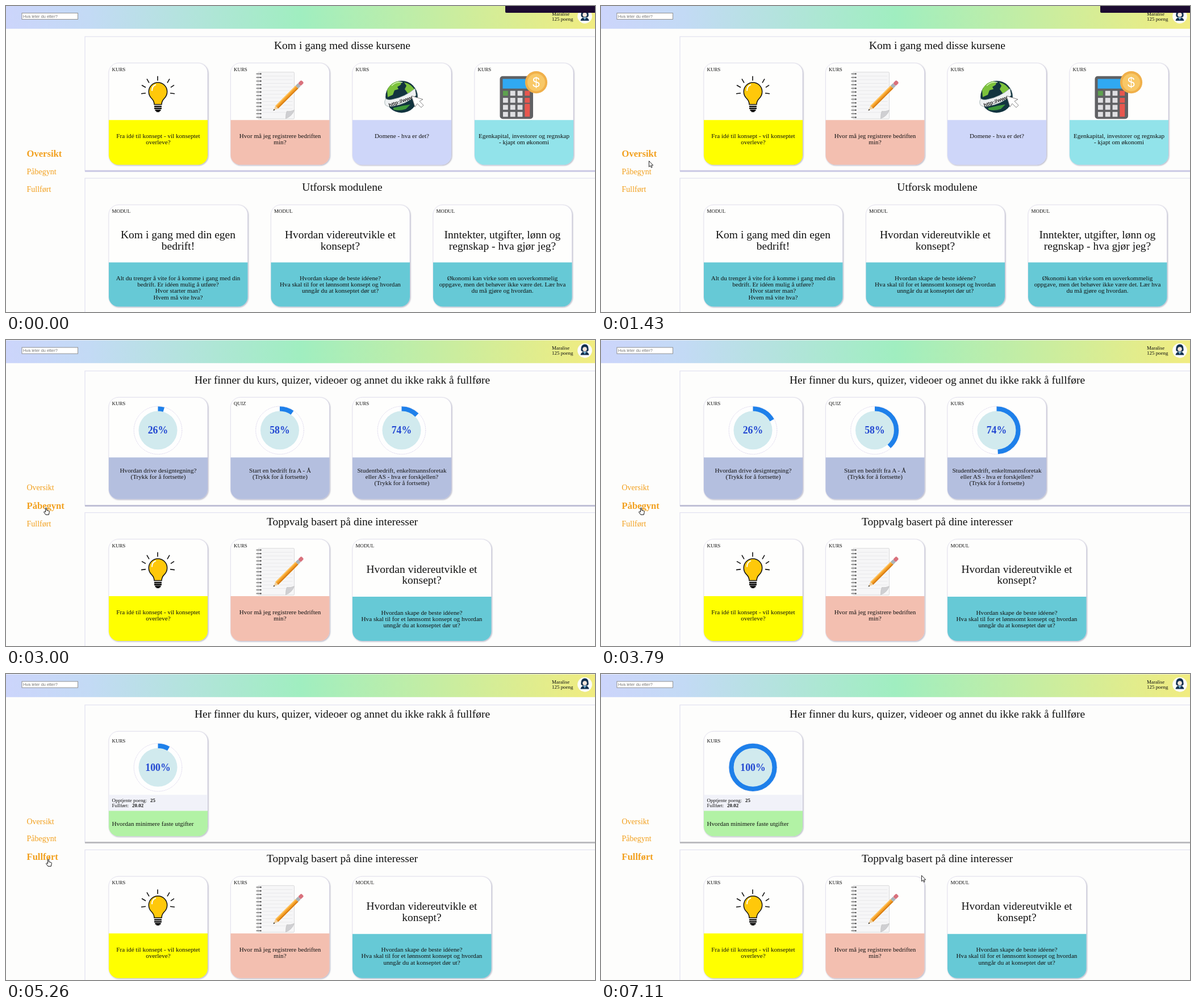
An HTML page for the animation above (7.16 s loop, 1037 by 540 pixels).

```html
<!DOCTYPE html>
<html lang="no">
<head>
<meta charset="utf-8">
<style>
  html, body { margin: 0; width: 100%; height: 100%; overflow: hidden; background: #fdfdfc; }
  svg { display: block; width: 1037px; height: 540px; font-family: "Liberation Serif", serif; fill: #111; }
  .mid { text-anchor: middle; }
  .title { font-size: 19.5px; }
  .body { font-size: 11.15px; }
  .small { font-size: 8.95px; }
  .pct { font: bold 17.8px "Liberation Serif", serif; fill: #2348d2; }
  .nav { font-size: 14px; fill: #f2a01e; }
  .nav.on { font-size: 16.6px; font-weight: bold; }
  .card { filter: drop-shadow(1.6px 1.6px 1.2px #70709088); }
  .status { font: 6.87px "Open Sans", sans-serif; fill: #555; }
</style>
</head>
<body>
<svg id="stage" viewBox="0 0 1037 540"></svg>
<script>
const LOOP = 7160, PAGE_STARTS = [0, 2730, 5130], RING_TIME = 1600;
const LINKS = [['Oversikt', 0], ['Påbegynt', 284], ['Fullført', 315]];
const BLUE = '#b4bfdf', TEAL = '#66c9d6';

const rect = (x, y, w, h, fill, more = '') =>
  `<rect x="${x}" y="${y}" width="${w}" height="${h}" fill="${fill}" ${more}/>`;
const circle = (x, y, r, fill, more = '') => `<circle cx="${x}" cy="${y}" r="${r}" fill="${fill}" ${more}/>`;
const path = (d, fill, stroke = 'none', width = 1) =>
  `<path d="${d}" fill="${fill}" stroke="${stroke}" stroke-width="${width}"/>`;
const text = (x, y, cls, str) => `<text x="${x}" y="${y}" class="${cls}">${str}</text>`;
const lines = (x, y, cls, list, step) => list.map((s, i) => text(x, y + i * step, cls, s)).join('');
const at = (x, y, inner, more = '') => `<g transform="translate(${x} ${y}) ${more}">${inner}</g>`;
const repeat = (n, make) => Array.from({ length: n }, (_, i) => make(i)).join('');

// Icons are drawn relative to the top left corner of their card.
const bulb =
  path('M86 23v8M67 28l4 7M107 28l-4 7M58 39l7 4M115 39l-6 4M57 54l8-1M108 53l8 1', 'none', '#111', 1.6) +
  path('M80 73q0-6-5-11a16.200 16.200 0 1 1 23 0q-5 5-5 11z', '#ffc80a', '#111', 1.5) +
  path('M76 49q0-9 7-11', 'none', '#fff', 2) +
  path('M80 76.500h13M80 80h13M81.500 83.300h10', 'none', '#111', 2.6) +
  path('M83 84h7l-1 2.500h-5z', '#111');

const notepad =
  rect(48, 16, 64, 82.5, '#f6f6f7', 'stroke="#d2d2d4" stroke-width=".8" rx="1.5"') +
  repeat(11, i => path(`M56 ${23 + i * 6.4}H109`, 'none', '#e2e2e6', .7)) +
  path('M97 98q0-9 2-13 6 1 13-2-4 11-15 15z', '#cfcfd2', '#bbb', .6) +
  repeat(13, i => path(`M45 ${19 + i * 6.4}h8`, 'none', '#888', 1.8) + circle(53, 19 + i * 6.4, 1.2, '#444')) +
  at(75, 84,
    path('M0 0L9-3.400V3.400z', '#f0cf9c') + path('M0 0L3-1.200V1.200z', '#222') +
    rect(9, -3.4, 50, 6.8, '#f5a028') + rect(9, 1.2, 50, 2.2, '#d97f16') + rect(9, -3.4, 50, 1.7, '#ffc45c') +
    rect(59, -3.4, 6, 6.8, '#a9b2b8') + rect(65, -3.4, 8, 6.8, '#d9717c', 'rx="2"'), 'rotate(-45)');

const globe =
  circle(86.5, 59.5, 28.3, '#12343f') +
  path('M61 48q6-14 20-16 8 2 3 7l-5 3 2 4-7 2-3 8-9 4zM91 34q14 3 20 16l-7 6-7-3-5-7 3-6z', '#7cc23c') +
  path('M72 82q10 3 22-1l8-8-12 2-18 4z', '#3f9a3a') +
  path('M69 40q8-8 19-6', 'none', '#d9f2c0', 1.5) +
  path('M59 63q-4 5-1 11 4 4 13 2Q94 73 112 57l-2-12Q92 60 71 64q-8 2-12-1z', '#eef1f2', '#9aa', .8) +
  `<text transform="translate(65 77.500) rotate(-19)" font-family="Liberation Sans, sans-serif" font-weight="bold" font-size="9" fill="#222">http://www</text>` +
  path('M104 58l20 6-6 3.500 7 7-4 4-7-7-4 6z', '#fff', '#777', .9);

const calculator =
  rect(44.5, 23, 58.5, 75.5, '#606164', 'rx="5"') + rect(49.5, 28, 48, 17, '#30a9f2') +
  repeat(15, i => rect(50 + i % 4 * 12.8, 49 + (i >> 2) * 12.4, 8.8, 8.6,
    i == 0 ? '#5ea24f' : i % 4 == 3 ? '#e8574f' : '#dfdfe2')) +
  rect(88.4, 72, 8.8, 22.6, '#e8574f') +
  circle(108.5, 34, 19.6, '#f0b04a') + circle(108.5, 34, 15.5, '#f8c867') +
  '<text x="108.500" y="42" class="mid" font-family="Liberation Sans, sans-serif" font-size="23" fill="#fff">$</text>';

const ring = (percent, y = 58) =>
  circle(86.5, y, 42.3, '#fefefe', 'stroke="#cfc8e6" stroke-width=".7" stroke-dasharray="2 1"') +
  circle(86.5, y, 34, '#d1eaee') +
  `<circle class="arc" data-percent="${percent}" cx="86.5" cy="${y}" r="38" pathLength="100" fill="none"
    stroke="#1e80ea" stroke-width="8.2" transform="rotate(-90 86.5 ${y})"/>` +
  text(86.5, y + 6, 'mid pct', percent + '%');

const card = (x, y, w, h, split, color, inner) => at(x, y,
  `<g class="card">${rect(0, 0, w, h, '#fefefd', 'rx="17" stroke="#d9d6ea" stroke-width=".6"')}</g>` +
  path(`M0 ${split}H${w}V${h - 17}a17 17 0 0 1-17 17H17a17 17 0 0 1-17-17z`, color) + inner);

const course = (x, y, color, icon, words, label = 'KURS', split = 100.5) =>
  card(x, y, 174, 179.5, split, color,
    icon + text(5.5, 14, 'small', label) + lines(87, 132.6, 'mid body', words, 11.2));

const modul = (x, title, words) => card(x, 351, 244.5, 179.5, 101.5, TEAL,
  text(5.5, 14, 'small', 'MODUL') + lines(122, 59, 'mid title', title, 19.7) +
  lines(122, 133, 'mid body', words, 11.2));

const section = (y, h, title, shadow) =>
  rect(139, y, 910, h, '#fdfdfc', 'stroke="#e2e1f0" stroke-width="1.2"') +
  path(`M139 ${y + h + .3}H1037`, 'none', shadow, 3) + text(592, y + 22, 'mid title', title);

const nav = (active, ys) => LINKS.map(([name], i) =>
  text(36.5, ys[i], i == active ? 'nav on' : 'nav', name)).join('');

const idea = y => course(181, y, '#ffff00', bulb, ['Fra idé til konsept - vil konseptet', 'overleve?']);
const register = y => course(395.5, y, '#f3bfb0', notepad, ['Hvor må jeg registrere bedriften', 'min?']);
const develop = x => modul(x, ['Hvordan videreutvikle et', 'konsept?'],
  ['Hvordan skape de beste idéene?', 'Hva skal til for et lønnsomt konsept og hvordan', 'unngår du at konseptet dør ut?']);

const overview = nav(0, [266, 297, 328]) +
  section(54, 237, 'Kom i gang med disse kursene', '#cac8e4') +
  idea(100.7) + register(100.7) +
  course(610, 100.7, '#ced6f9', globe, ['Domene - hva er det?']) +
  course(825, 100.7, '#92e3ea', calculator, ['Egenkapital, investorer og regnskap', '- kjapt om økonomi']) +
  section(304, 260, 'Utforsk modulene', '#cac8e4') +
  modul(181, ['Kom i gang med din egen', 'bedrift!'],
    ['Alt du trenger å vite for å komme i gang med din', 'bedrift. Er idéen mulig å utføre?', 'Hvor starter man?', 'Hvem må vite hva?']) +
  develop(466.5) +
  modul(752, ['Inntekter, utgifter, lønn og', 'regnskap - hva gjør jeg?'],
    ['Økonomi kan virke som en uoverkommelig', 'oppgave, men det behøver ikke være det. Lær hva', 'du må gjøre og hvordan.']);

const unfinished = 'Her finner du kurs, quizer, videoer og annet du ikke rakk å fullføre';
const goOn = '(Trykk for å fortsette)';
const topPicks = section(304, 260, 'Toppvalg basert på dine interesser', '#bbb') +
  idea(351) + register(351) + develop(610);

const started = nav(1, [264, 297, 328]) + section(54, 237.5, unfinished, '#c0c0d6') +
  course(181, 100.7, BLUE, ring(26), ['Hvordan drive designtegning?', goOn], 'KURS', 106) +
  course(395.5, 100.7, BLUE, ring(58), ['Start en bedrift fra A - Å', goOn], 'QUIZ', 106) +
  course(610, 100.7, BLUE, ring(74), ['Studentbedrift, enkeltmannsforetak', 'eller AS - hva er forskjellen?', goOn], 'KURS', 106) +
  topPicks;

const finished = nav(2, [264, 294.5, 327.5]) + section(54, 242.5, unfinished, '#bcbcc0') +
  card(181, 100.7, 174, 185, 140, '#b2f2a5',
    rect(0, 112, 174, 28, '#f1f2f9') + text(5.5, 20, 'small', 'KURS') + ring(100, 63.5) +
    lines(5.5, 124.5, 'small', [
      'Opptjente poeng: <tspan x="73" font-weight="bold">25</tspan>',
      'Fullført: <tspan x="41" font-weight="bold">20.02</tspan>'], 9) +
    text(5.5, 167, 'body', 'Hvordan minimere faste utgifter')) +
  at(0, 5.7, topPicks);

const header = rect(0, 0, 1037, 40.2, 'url(#sky)') +
  rect(28, 12.5, 98.5, 11, '#fff', 'stroke="#888" stroke-width=".9"') +
  '<text x="30" y="20.500" font-family="Liberation Sans, sans-serif" font-size="7.4" fill="#777">Hva leter du etter?</text>' +
  text(961, 16.8, 'small', 'Maralise') + text(961, 25.6, 'small', '125 poeng') +
  circle(1019, 18, 12.8, '#fcfdfd') +
  path('M1012.500 18q-1-11 6.500-11t6.500 11l-2 2h-9z', '#12304f') + circle(1019, 15.5, 3.8, '#f4e6dc') +
  path('M1011.500 26q1-5 5-5.500l2.500 3 2.500-3q4 .5 5 5.500z', '#12304f') + path('M1017 20.500h4l-2 4.500z', '#6fb6dc');

const arrow = path('M0 0V10.400L2.400 8.200 4 11.800 5.600 11 4.100 7.600H7.200z', '#fff', '#111', .9);
const hand = path('M-1 1q1-1.500 2 0V5l3.800 1q1.300.400 1 2l-1 4.800H-.600L-4 8q.500-1.700 3 0z', '#fff', '#111', 1);

const stage = document.getElementById('stage');
stage.innerHTML =
  `<linearGradient id="sky"><stop stop-color="#ccd5fb"/><stop offset=".14" stop-color="#c3daf5"/>
   <stop offset=".5" stop-color="#a0eec0"/><stop offset="1" stop-color="#f1ec80"/></linearGradient>` +
  `<g id="site">${header}${[overview, started, finished].map(p => `<g class="page">${p}</g>`).join('')}</g>` +
  `<path id="overlay" d="M879 0H1037V12H881q-2 0-2-2z" fill="#1c0b31"/>` +
  `<g id="status"><rect x="-1" y="525" height="16" fill="#fff" stroke="#bbb" stroke-width=".8"/>${text(4, 535.5, 'status', '')}</g>` +
  `<g id="cursor"><g>${arrow}</g><g>${hand}</g></g>`;

const [site, overlay, status, cursor] = ['site', 'overlay', 'status', 'cursor'].map(id => document.getElementById(id));
const pages = [...stage.querySelectorAll('.page')];
const arcs = [...stage.querySelectorAll('.arc')];
const show = (el, on) => el.style.display = on ? '' : 'none';

// time, x, y
const MOVES = [
  [90, 1040, 30], [740, 200, 240], [1200, 84.5, 273.5], [1500, 84.5, 273.5], [1900, 70.5, 295.5],
  [3850, 70.5, 295.5], [4250, 74.5, 326.5], [5350, 74.5, 326.5], [6040, 168, 322.5],
  [6350, 168, 322.5], [7050, 564.5, 355.5], [LOOP, 564.5, 355.5]];

function pointer(t) {
  const i = MOVES.findIndex(m => m[0] > t);
  if (i < 1) return [1100, 30];
  const [t0, x0, y0] = MOVES[i - 1], [t1, x1, y1] = MOVES[i];
  const u = (t - t0) / (t1 - t0), k = u * u * (3 - 2 * u);
  return [x0 + (x1 - x0) * k, y0 + (y1 - y0) * k];
}

function draw(now) {
  const t = now % LOOP;
  const page = PAGE_STARTS.filter(s => s <= t).length - 1;
  const progress = Math.min(1, (t - PAGE_STARTS[page]) / RING_TIME);
  pages.forEach((el, i) => show(el, i == page));
  arcs.forEach(el => el.setAttribute('stroke-dasharray', `${el.dataset.percent * progress} 200`));
  site.setAttribute('transform', `translate(0 ${page ? .6 : 0})`);
  show(overlay, page == 0);

  const [x, y] = pointer(t);
  const link = x < 92 ? LINKS.findIndex(([, top]) => top && y >= top && y < top + 16) : -1;
  cursor.setAttribute('transform', `translate(${x} ${y})`);
  show(cursor.children[0], link < 0);
  show(cursor.children[1], link >= 0);

  const hint = link > 0 && link == page + 1;
  show(status, hint);
  if (hint) {
    status.children[0].setAttribute('width', link == 1 ? 129 : 120);
    status.children[1].textContent = `localhost/Trivselslaben/${LINKS[link][0].toLowerCase()}.php`;
  }
  requestAnimationFrame(draw);
}
requestAnimationFrame(draw);
</script>
</body>
</html>
```
